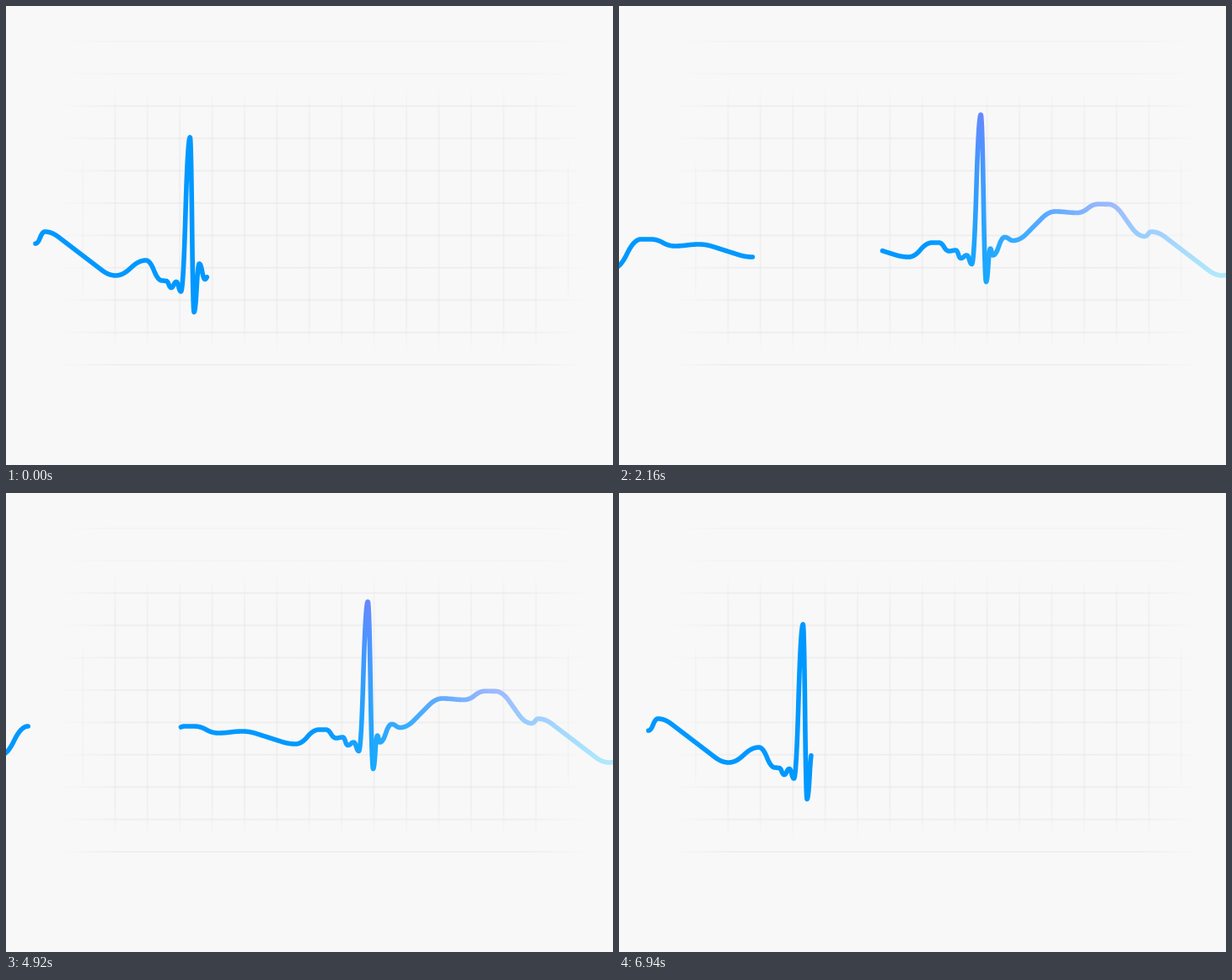
These frames come from a looping animation (720x545 px, 6960 ms). An HTML page with a canvas:

```html
<!DOCTYPE html>
<html lang="en">
<head>
<meta charset="utf-8">
<title>Heartbeat line</title>
<style>
html, body { margin: 0; width: 100%; height: 100%; overflow: hidden; background: #f8f8f8; }
canvas { display: block; }
</style>
</head>
<body>
<canvas id="stage" width="720" height="545"></canvas>
<script>
const W = 720, H = 545, LOOP = 6960, REPEAT = 2850, TAIL_LAG = 860;
const BEAT = 660, STEP = 0.2, ROUNDING = 16;
const ctx = document.getElementById('stage').getContext('2d');

function layer(draw) {
  const c = document.createElement('canvas');
  c.width = W;
  c.height = H;
  draw(c.getContext('2d'));
  return c;
}

function gradient(g, x0, y0, x1, y1, ...stops) {
  const fill = g.createLinearGradient(x0, y0, x1, y1);
  stops.forEach(([at, color]) => fill.addColorStop(at, color));
  return fill;
}

function cover(g, fill, mode = 'source-over') {
  g.globalCompositeOperation = mode;
  g.fillStyle = fill;
  g.fillRect(0, 0, W, H);
}

// Faint graph paper whose lines fade at their ends
const grid = layer(g => {
  cover(g, '#f8f8f8');
  const soft = (x0, y0, x1, y1, alpha) => {
    const on = `rgba(226,226,226,${alpha})`, off = 'rgba(226,226,226,0)';
    g.fillStyle = gradient(g, x0, y0, x1, y1, [0, off], [0.12, on], [0.88, on], [1, off]);
  };
  for (let i = 0; i < 11; i++) {
    const y = 42 + i * 38.4;
    soft(60, 0, 690, 0, i < 2 ? 0.2 : 0.42);
    g.fillRect(60, y - 1, 630, 2);
  }
  for (let i = 0; i < 16; i++) {
    const x = 91 + i * 38.4, edge = i % 15 === 0;
    const top = edge ? 180 : 96, bottom = edge ? 350 : 412;
    soft(0, top, 0, bottom, edge ? 0.2 : 0.36);
    g.fillRect(x - 1, top, 2, bottom - top);
  }
});

// Stroke paint: blue, turning violet above and cyan below, fading to the right
const tint = layer(g => {
  cover(g, gradient(g, 0, 130, 0, 335, [0, 'rgb(192,122,255)'], [1, 'rgb(88,222,255)']));
  cover(g, gradient(g, 345, 235, 550, 163, [0, 'rgba(0,0,0,0)'], [1, '#000']), 'destination-in');
});
const paint = ctx.createPattern(layer(g => {
  cover(g, '#0098ff');
  g.drawImage(tint, 0, 0);
  cover(g, gradient(g, 520, 0, 720, 0, [0, '#000'], [1, 'rgba(0,0,0,.45)']), 'destination-in');
}), 'no-repeat');

// Crests and troughs of one period: a low beat, then a high one
const beats = [
  [46, 268], [130, 320], [166, 302], [185, 326], [190, 326.5], [196, 334.5], [202, 327.5], [207.5, 339],
  [218.3, 156], [223, 363.5], [229.3, 306], [236, 324.5], [244.5, 306], [253, 311.5],
  [286, 277], [298, 277], [326, 285], [355, 283], [418, 298], [446, 281], [454, 281],
  [466, 291], [474, 290], [480, 299.5], [487, 296], [493, 306.5],
  [503.7, 129], [510, 327.5], [515, 288], [518, 296], [532, 274.5], [542, 278.5],
  [592, 244], [618, 245.5], [643, 235.2], [655, 235.4], [698, 273.5]
];
const knots = [[35, 282], ...beats, ...beats.map(([x, y]) => [x + BEAT, y])];

// Straight rise with parabolic ends that each take the share r
function roundedRise(u, r) {
  const slope = 1 / (1 - r);
  if (u < r) return slope * u * u / (2 * r);
  if (u > 1 - r) return 1 - slope * (1 - u) ** 2 / (2 * r);
  return slope * (u - r / 2);
}

// The whole line, sampled as [x, y, arc length]
const curve = [];
for (let i = 0, k = 0, arc = 0; i < 970 / STEP; i++) {
  const x = knots[0][0] + i * STEP;
  while (x > knots[k + 1][0]) k++;
  const [x0, y0] = knots[k], [x1, y1] = knots[k + 1], h = x1 - x0;
  const y = y0 + (y1 - y0) * roundedRise((x - x0) / h, Math.min(0.5, ROUNDING / h));
  if (i) arc += Math.hypot(STEP, y - curve[i - 1][1]);
  curve.push([x, y, arc]);
}
const total = curve[curve.length - 1][2];

const arcAt = x => curve[Math.max(0, Math.round((x - knots[0][0]) / STEP))][2];

function indexOf(arc) {
  let lo = 0, hi = curve.length - 1;
  while (lo < hi) {
    const mid = (lo + hi) >> 1;
    if (curve[mid][2] < arc) lo = mid + 1; else hi = mid;
  }
  return lo;
}

function pointAt(arc) {
  const i = Math.max(1, indexOf(arc)), [x0, y0, s0] = curve[i - 1], [x1, y1, s1] = curve[i];
  const u = (arc - s0) / (s1 - s0);
  return [x0 + (x1 - x0) * u, y0 + (y1 - y0) * u];
}

// Each sweep crosses the stage at a steady speed: it enters at start and leaves after span
const opening = { shift: 0, start: 6493, span: 1125 };
const middle = { shift: 74.5, start: 605, span: 1445 };
const closing = { shift: 260, start: 2043, span: 1150 };
const again = sweep => ({ ...sweep, start: sweep.start + REPEAT });
const sweeps = [opening, middle, closing, again(middle), again(closing)];

function headArc({ shift, start, span }, time) {
  const from = arcAt(shift), to = arcAt(shift + W);
  const arc = from + (to - from) * (time - start) / span;
  return Math.min(total, Math.max(0, arc));
}

function drawSweep(sweep, time) {
  const from = headArc(sweep, time - TAIL_LAG), to = headArc(sweep, time);
  if (to - from < 1) return;
  const points = [pointAt(from), ...curve.slice(indexOf(from), indexOf(to)), pointAt(to)];
  ctx.beginPath();
  points.forEach(([x, y]) => ctx.lineTo(x - sweep.shift, y));
  ctx.stroke();
}

ctx.lineWidth = 5.6;
ctx.lineCap = ctx.lineJoin = 'round';
ctx.strokeStyle = paint;
const begin = performance.now();

function frame() {
  const time = (performance.now() - begin) % LOOP;
  ctx.drawImage(grid, 0, 0);
  for (const sweep of sweeps) {
    drawSweep(sweep, time);
    drawSweep(sweep, time + LOOP);
  }
  requestAnimationFrame(frame);
}
frame();
</script>
</body>
</html>
```
